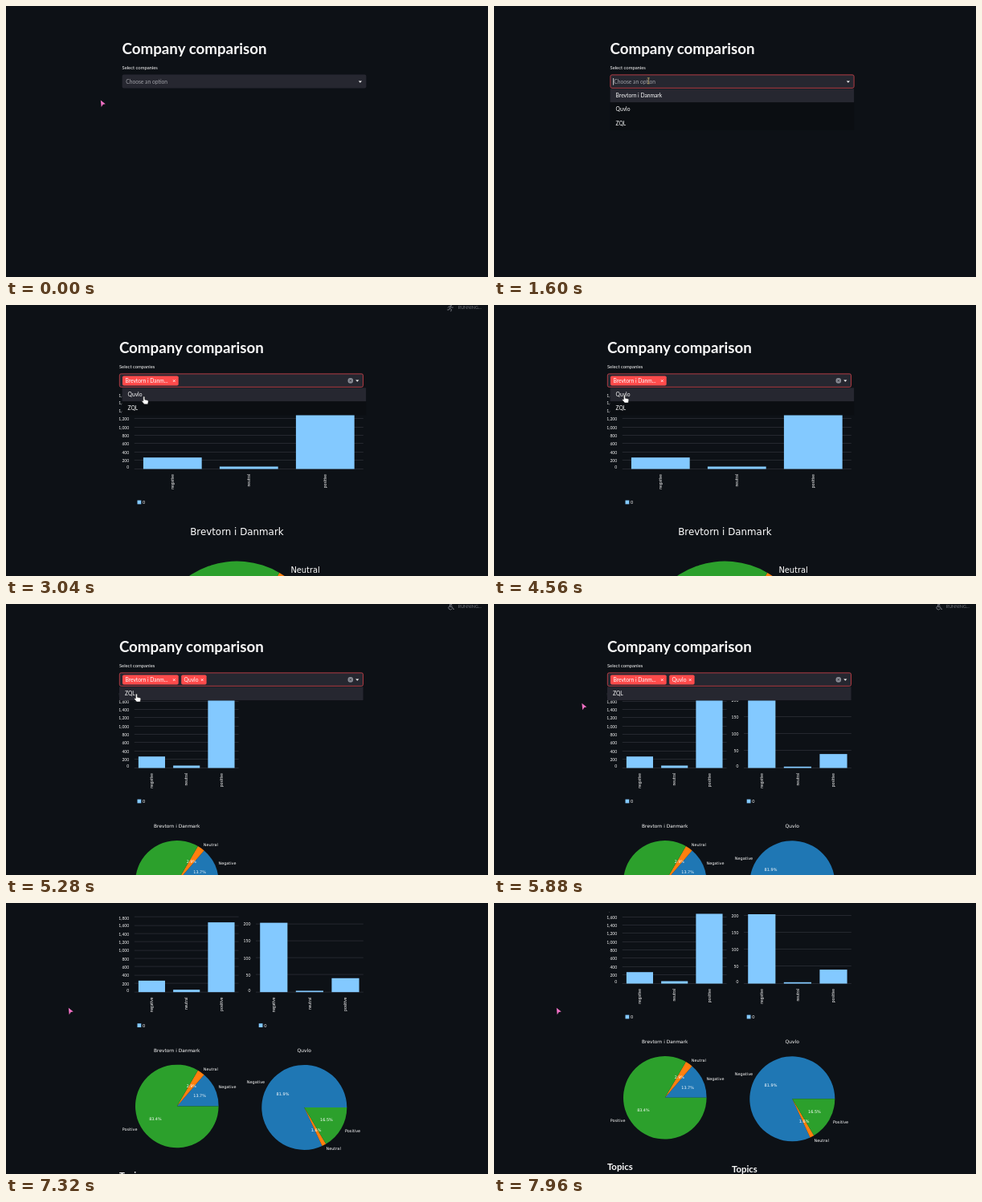
These frames come from a looping animation (600x338 px, 8 s). An HTML page:

```html
<!DOCTYPE html>
<html lang="en">
<head>
<meta charset="utf-8">
<title>Company comparison</title>
<style>
  html, body { margin: 0; width: 100%; height: 100%; overflow: hidden; background: #0d1116; }
  svg { display: block; width: 100vw; height: 100vh; }
  text { font-family: Lato, "Open Sans", sans-serif; fill: #fafafa; white-space: pre; }
  text.plot { font-family: "DejaVu Sans", sans-serif; fill: #fff; }
</style>
</head>
<body>
<svg id="stage" viewBox="0 0 600 338" xmlns="http://www.w3.org/2000/svg"></svg>
<script>
const LOOP = 8000;
const BG = '#0d1116', FIELD = '#262730', RED = '#ff4b4b', BAR = '#83c9ff';
const FIRST = 'Brevtorn i Danmark', SECOND = 'Quvlo', THIRD = 'ZQL';

// Moments of the story, in ms
const T = {
  focus: 1160, menu: 1240, pick1: 2040, chart1: 2400, pie1: 2640, done1: 3480,
  pick2: 5120, columns: 5200, chart2: 5520, pie2: 5760, done2: 6120, blur: 6200,
  scroll: [6840, 7440]
};
const SCROLL = 104, SHIFT = 3.6;

const text = (x, y, size, str, attrs = '') =>
  `<text x="${x}" y="${y}" font-size="${size}" ${attrs}>${str}</text>`;
const rect = (x, y, w, h, fill, attrs = '') =>
  `<rect x="${x}" y="${y}" width="${w}" height="${h}" fill="${fill}" ${attrs}/>`;
const path = (d, attrs) => `<path d="${d}" ${attrs}/>`;
const cross = (x, y, r, color) =>
  path(`M${x - r} ${y - r}l${2 * r} ${2 * r}m0 ${-2 * r}l${-2 * r} ${2 * r}`,
    `stroke="${color}" stroke-width=".9" fill="none"`);

const tag = (x, w, label) =>
  rect(x, 88.5, w, 12, RED, 'rx="1.8"') + text(x + 3.4, 96.9, 6.7, label) +
  cross(x + w - 5.4, 94.6, 1.2, '#fff');

const menu = (x, items) =>
  rect(x, 103.3, 303.6, 17.1 * items.length, '#0b0e12') +
  rect(x, 103.3, 303.6, 16.8, FIELD) +
  items.map((s, i) => text(x + 7, 114.2 + 17.2 * i, 6.7, s)).join('');

// Bar chart: axis from x0 to x1, `unit` pixels for every `step` on the scale
function chart(x0, x1, step, unit, ticks, values) {
  const base = 204.5, band = (x1 - x0) / 3.0, width = band * 0.766;
  let out = '';
  for (let i = 0; i <= ticks; i++) {
    const y = base - unit * i;
    const labelY = i === 0 ? y - 2.4 : y === base - unit * 9 ? y + 1.4 : y;
    out += path(`M${x0} ${Math.round(y) - 0.5}H${x1}`, 'stroke="#25282f"') +
      text(x0 - 6.7, labelY + 1.9, 5, (i * step).toLocaleString('en-US'), 'text-anchor="end"');
  }
  ['negative', 'neutral', 'positive'].forEach((name, i) => {
    const mid = x0 + band * (i + 0.5), h = values[i] * unit / step;
    out += rect(mid - width / 2, base - h, width, h, BAR) +
      text(0, 0, 5, name, `text-anchor="end" transform="translate(${mid + 1.7} 211) rotate(-90)"`);
  });
  return out + rect(x0 + 3.7, 243.6, 4.8, 4.8, BAR) + text(x0 + 10.2, 248, 5.4, '0');
}

// Pie counted counter-clockwise from three o'clock
function pie(cx, cy, r, title, titleY, shares) {
  const names = ['Negative', 'Neutral', 'Positive'], colors = ['#1f77b4', '#ff7f0e', '#2ca02c'];
  const size = r * 0.0942;
  const at = (share, k) => {
    const a = share * 2 * Math.PI / 100;
    return [cx + Math.cos(a) * r * k, cy - Math.sin(a) * r * k];
  };
  let slices = '', labels = '', sum = 0;
  shares.forEach((share, i) => {
    const mid = sum + share / 2, end = sum + share;
    slices += path(`M${cx} ${cy}L${at(sum, 1)}A${r} ${r} 0 ${+(share > 50)} 0 ${at(end, 1)}Z`,
      `fill="${colors[i]}"`);
    const [lx, ly] = at(mid, 1.1), [px, py] = at(mid, 0.6), drop = size * 0.36;
    labels += text(lx, ly + drop, size, names[i],
        `class="plot" text-anchor="${lx < cx ? 'end' : 'start'}"`) +
      text(px, py + drop, size, share.toFixed(1) + '%', 'class="plot" text-anchor="middle"');
    sum = end;
  });
  return slices + labels +
    text(cx, titleY, size * 1.2, title, 'class="plot" text-anchor="middle"');
}

const topics = (x, y) => text(x, y, 11.4, 'Topics', 'font-weight="700"');
const counts1 = [276, 58, 1680], counts2 = [204, 4, 41];
const shares1 = [13.7, 2.9, 83.4], shares2 = [81.9, 1.6, 16.5];

const stage = document.getElementById('stage');
const layers = [];
const layer = (from, to, markup) => {
  layers.push([from, to]);
  return `<g class="layer">${markup}</g>`;
};

const page =
  text(140.9, 60.4, 18.75, 'Company comparison', 'font-weight="700"') +
  text(140.9, 79, 5.85, 'Select companies') +
  rect(141, 85.5, 303.8, 17, FIELD, 'rx="2"') +
  layer(T.focus, T.blur, rect(141.3, 85.9, 303.2, 16.4, 'none', 'rx="2" stroke="#c03d43" stroke-width=".9"')) +
  layer(0, T.pick1, text(145.6, 96.9, 6.7, 'Choose an option', 'style="fill:#9fa0a6"')) +
  layer(T.focus, T.focus + 500, rect(144.7, 90, 0.8, 8.6, '#fafafa')) +
  path('M435.2 93.4h4.2l-2.1 2.3z', 'fill="#fafafa"') +
  layer(T.pick1, LOOP, tag(145, 69.7, 'Brevtorn i Danm...') +
    `<circle cx="428.8" cy="94.4" r="3.3" fill="#8a8c95"/>` + cross(428.8, 94.4, 1.1, FIELD)) +
  layer(T.pick2, LOOP, tag(218.2, 31.4, SECOND)) +
  layer(T.chart1, T.columns, chart(159.8, 444.8, 200, 10.36, 9, counts1)) +
  layer(T.pie1, T.columns, pie(287.4, 424.6, 105, FIRST, 287, shares1)) +
  layer(T.columns, LOOP, chart(159.8, 289.6, 200, 10.36, 9, counts1) +
    pie(212.8, 346.8, 51.8, FIRST, 279, shares1) + topics(140.9, 437)) +
  layer(T.chart2, LOOP, chart(311, 444.8, 50, 21.2, 4, counts2)) +
  layer(T.pie2, LOOP, pie(371.3, 348.3, 53, SECOND, 279, shares2) + topics(296, 440.3));

const menus =
  layer(T.menu, T.pick1, menu(144.6, [FIRST, SECOND, THIRD])) +
  layer(T.pick1, T.columns, menu(144.6, [SECOND, THIRD])) +
  layer(T.columns, T.blur, menu(141, [THIRD]));

const gray = 'fill="none" stroke="#71747c" stroke-width="1" stroke-linecap="round"';
const figures = [
  'M553.6 1.6L552.4 4.2L554.6 5.6L553.8 7.8M552.4 4.2L551.4 6L549.6 6M550.4 3.2L551.4 1.8L553.6 1.8L555 3.2L556.4 3',
  'M552.6 .6V3.6H555.4L556.6 6.4H557.6M551.4 3A2.3 2.3 0 1 0 555 6.2M552.8 1.8H555',
  'M549.8 6.8L552.2 4.4L555 5.2L556.8 7M552.2 4.4L554 1.8L556.6 2.6'
];
const header = rect(0, 0, 600, 11, BG) +
  `<g id="running">` + text(562.8, 5.1, 5.4, 'RUNNING...', 'style="fill:#71747c"') +
  figures.map(d => `<g class="figure">${path(d, gray)}<circle cx="554.2" cy=".2" r=".9" fill="#71747c"/></g>`).join('') +
  `</g>`;

const pointers = [
  path('M0 0L6 4.6L3 5.2L.9 8.4Z', 'fill="#f070c4"'),
  path('M-1.5 -3.4H1.5M0 -3.4V3.6M-1.5 3.6H1.5', 'fill="none" stroke="#b9a566" stroke-width=".8"'),
  path('M-1 .6Q0-.8 1 .6V4l3.4.8q1.2.4 1 1.7L4.7 9.8H.3L-2.7 6.2q-.1-1.6 1.7-.5Z',
    'fill="#fff" stroke="#111" stroke-width=".5"')
].map(p => `<g class="pointer">${p}</g>`).join('');

stage.innerHTML = `<g id="page">${page}</g>${menus}${header}<g id="cursor">${pointers}</g>`;

const $ = id => document.getElementById(id);
const all = name => [...stage.getElementsByClassName(name)];
const groups = all('layer'), figureEls = all('figure'), pointerEls = all('pointer');
const show = (el, on) => { el.style.display = on ? '' : 'none'; };
const ease = k => k * k * (3 - 2 * k);
const ramp = (t, a, b) => ease(Math.min(1, Math.max(0, (t - a) / (b - a))));

// Cursor stops: time, x, y
const stops = [
  [0, 117.8, 117.6], [360, 117.8, 117.6], [920, 192.3, 93.2], [1620, 192.3, 93.2],
  [1960, 171.8, 114], [4080, 171.8, 114], [4560, 162.4, 112.2], [5600, 162.4, 112.2],
  [6080, 77.8, 130.8], [LOOP, 77.8, 130.8]
];
function cursorAt(t) {
  const i = stops.findIndex(s => s[0] > t);
  const [a, x0, y0] = stops[i - 1], [b, x1, y1] = stops[i];
  const k = ramp(t, a, b);
  return [x0 + (x1 - x0) * k, y0 + (y1 - y0) * k];
}
function pointerKind(t, x, y) {
  if (x < 142 || t > T.blur) return 0;
  if (y < 103) return 1;
  return t > T.menu ? 2 : 0;
}

function draw(t) {
  layers.forEach(([from, to], i) => show(groups[i], t >= from && t < to));
  const dx = t < T.pie1 ? SHIFT : 0;
  const dy = -SCROLL * ramp(t, ...T.scroll);
  $('page').setAttribute('transform', `translate(${dx} ${dy})`);

  const start = t < T.pick2 ? T.pick1 : T.pick2;
  show($('running'), t >= start && t < (t < T.pick2 ? T.done1 : T.done2));
  const figure = Math.floor(Math.max(0, t - start) / 160) % 3;
  figureEls.forEach((el, i) => show(el, i === figure));

  const [x, y] = cursorAt(t);
  const kind = pointerKind(t, x, y);
  pointerEls.forEach((el, i) => show(el, i === kind));
  $('cursor').setAttribute('transform', `translate(${x} ${y})`);
}

function frame() {
  draw(performance.now() % LOOP);
  requestAnimationFrame(frame);
}
frame();
</script>
</body>
</html>
```
